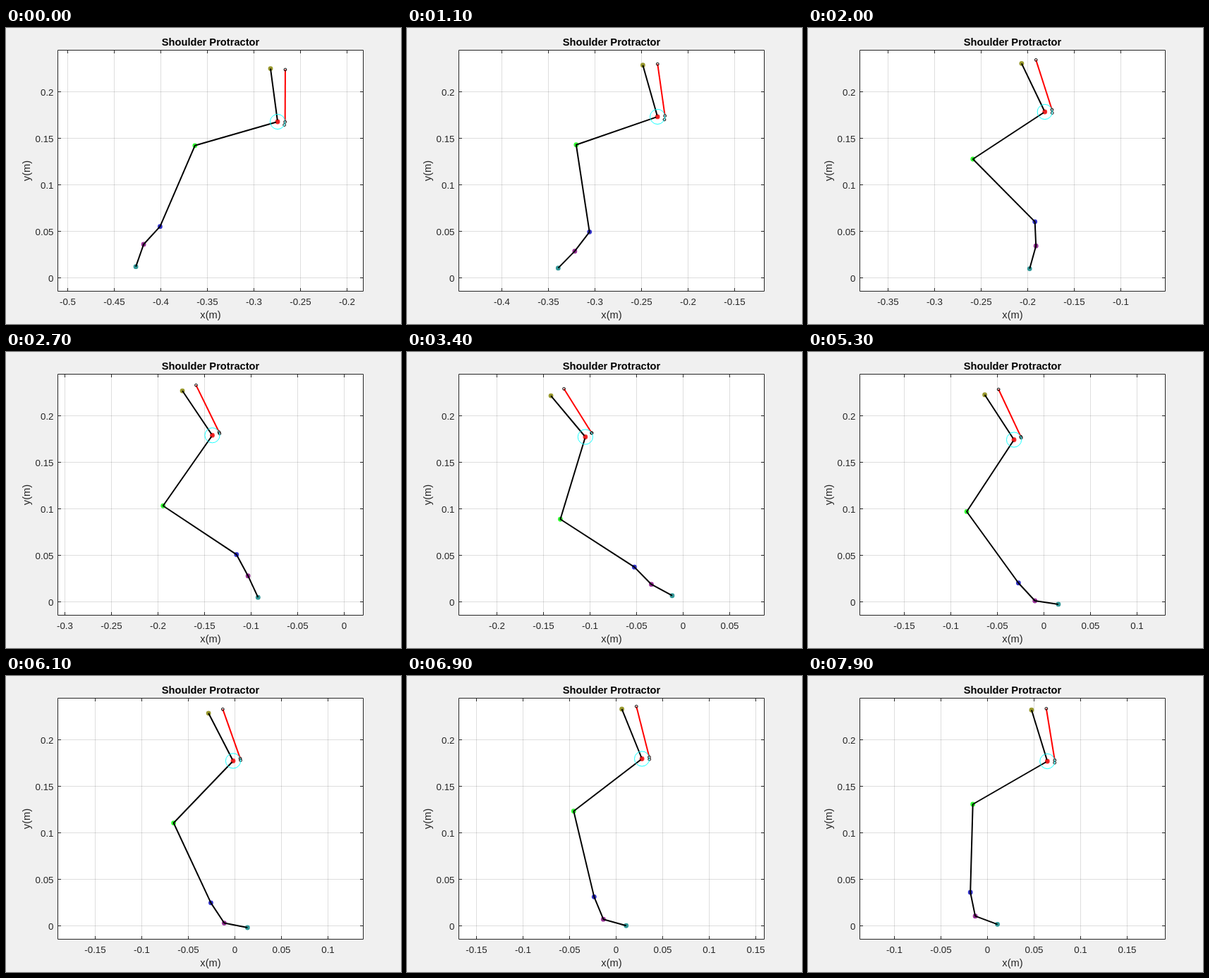
These frames come from a looping animation (560 px wide and 420 px high, 8 s). An HTML page with a canvas:

```html
<!DOCTYPE html>
<html lang="en">
<head>
<meta charset="utf-8">
<title>Shoulder Protractor</title>
<style>
  html, body { margin: 0; width: 100%; height: 100%; overflow: hidden; background: #f0f0f0; }
  canvas { display: block; }
</style>
</head>
<body>
<canvas id="stage" width="560" height="420"></canvas>
<script>
const ctx = document.getElementById('stage').getContext('2d');
const LOOP = 8000, STEP = 100, HOLD = 400;
const BOX = { left: 73.5, top: 31.5, right: 506.5, bottom: 373.5 };
const MID = (BOX.left + BOX.right) / 2;
const TICK = 66;       // pixels per 0.05 m
const GROUND = 354.5;  // y = 0
const INK = '#262626';
const FONT = '"Liberation Sans", Arial, sans-serif';
const RAD = Math.PI / 180;

// Time, shoulder x, shoulder y, then segment angles in degrees:
// scapula, humerus, forearm, metacarpus, hand
const POSES = [
  [400, -362, 133, 7.6, 73.9, 23.3, 42.6, 19.2],
  [1200, -300, 125, 17, 70, -13, 35, 45],
  [2000, -239.5, 119, 25.6, 56.7, -44.7, -2.5, 15.5],
  [3400, -139, 120.5, 39.9, 16.9, -57.1, -44.4, -61.5],
  [4200, -93.5, 125.5, 40.2, 17.2, -49.2, -46.8, -77],
  [5300, -42, 124.5, 33, 33.3, -35.9, -42.7, -81.5],
  [6900, 37, 117.5, 22, 52.5, -13.4, -22.4, -74.3],
  [7900, 84.5, 121, 17.1, 60, 1.6, -11.6, -69.6]
];
const LENGTHS = [122, 125, 34.4, 33.6];
const COLORS = ['#99992e', '#ff3333', '#33ff33', '#3333cc', '#993399', '#339999'];
const WRAP = 10.6;

function secant(i, c) {
  const a = POSES[i], b = POSES[i + 1];
  return (b[c] - a[c]) / (b[0] - a[0]);
}

function slope(i, c) {
  const last = POSES.length - 1;
  if (i === 0) return secant(0, c);
  if (i === last) return secant(last - 1, c);
  const before = POSES[i][0] - POSES[i - 1][0];
  const after = POSES[i + 1][0] - POSES[i][0];
  return (secant(i - 1, c) * after + secant(i, c) * before) / (before + after);
}

// Cubic Hermite interpolation of every pose column
function poseAt(t) {
  let i = 0;
  while (i < POSES.length - 2 && t >= POSES[i + 1][0]) i++;
  const a = POSES[i], b = POSES[i + 1];
  const d = b[0] - a[0], u = (t - a[0]) / d, v = 1 - u;
  return a.slice(1).map((p, k) => {
    const c = k + 1;
    return v * v * (1 + 2 * u) * p + u * u * (3 - 2 * u) * b[c]
      + u * v * d * (v * slope(i, c) - u * slope(i + 1, c));
  });
}

function down(p, deg, len) {
  return [p[0] - len * Math.sin(deg * RAD), p[1] + len * Math.cos(deg * RAD)];
}

function up(p, deg, len) {
  return [p[0] - len * Math.sin(deg * RAD), p[1] - len * Math.cos(deg * RAD)];
}

function onWrap(p, deg) {
  return [p[0] + WRAP * Math.cos(deg * RAD), p[1] - WRAP * Math.sin(deg * RAD)];
}

function solve(t) {
  const [x, y, scapula, ...angles] = poseAt(t);
  const shoulder = [x, y];
  const limb = [up(shoulder, scapula, 76.1), shoulder];
  angles.forEach((a, i) => limb.push(down(limb[i + 1], a, LENGTHS[i])));

  const tangent = scapula - 9, insertion = 48.5 - angles[0];
  const origin = up(onWrap(shoulder, tangent), scapula - 7.8, 74.2);
  const muscle = [origin, onWrap(shoulder, Math.max(tangent, insertion)), onWrap(shoulder, insertion)];

  // The view stays centred on the horizontal extent
  const xs = [...limb, ...muscle].map(p => p[0]);
  const shift = MID - (Math.min(...xs) + Math.max(...xs)) / 2;
  for (const p of [...limb, ...muscle]) p[0] += p === shoulder ? 0 : shift;
  shoulder[0] = x + shift;
  return { limb, muscle, shift };
}

function line(points, color, width) {
  ctx.strokeStyle = color;
  ctx.lineWidth = width;
  ctx.beginPath();
  points.forEach(p => ctx.lineTo(p[0], p[1]));
  ctx.stroke();
}

function ring(p, r, color, width) {
  ctx.strokeStyle = color;
  ctx.lineWidth = width;
  ctx.beginPath();
  ctx.arc(p[0], p[1], r, 0, 2 * Math.PI);
  ctx.stroke();
}

function dot(p, r, color) {
  ctx.fillStyle = color;
  ctx.beginPath();
  ctx.arc(p[0], p[1], r, 0, 2 * Math.PI);
  ctx.fill();
}

function text(str, x, y, size, align = 'center', color = INK, weight = '') {
  ctx.font = `${weight} ${size}px ${FONT}`;
  ctx.textAlign = align;
  ctx.fillStyle = color;
  ctx.fillText(str, x, y);
}

const label = k => String(+(k * 0.05).toFixed(2));

function drawAxes(zero) {
  const { left, top, right, bottom } = BOX;
  ctx.fillStyle = '#f0f0f0';
  ctx.fillRect(0, 0, 560, 420);
  ctx.fillStyle = '#fff';
  ctx.fillRect(left, top, right - left, bottom - top);

  const grid = 'rgba(38,38,38,0.15)';
  const first = Math.ceil((left - zero) / TICK), last = Math.floor((right - zero) / TICK);
  for (let k = first; k <= last; k++) {
    const x = Math.floor(zero + k * TICK) + 0.5;
    line([[x, top], [x, bottom]], grid, 1);
    line([[x, top], [x, top + 4.5]], INK, 1);
    line([[x, bottom], [x, bottom - 4.5]], INK, 1);
    text(label(k), x, 393, 13.33);
  }
  for (let k = 0; k < 5; k++) {
    const y = GROUND - k * TICK;
    line([[left, y], [right, y]], grid, 1);
    line([[left, y], [left + 4.5, y]], INK, 1);
    line([[right, y], [right - 4.5, y]], INK, 1);
    text(label(k), 67.5, y + 5.5, 13.33, 'right');
  }
  ctx.strokeStyle = INK;
  ctx.lineWidth = 1;
  ctx.strokeRect(left, top, right - left, bottom - top);

  text('Shoulder Protractor', MID, 25, 14.67, 'center', '#000', 'bold');
  text('x(m)', MID, 412, 14.67);
  ctx.save();
  ctx.translate(34, 202.5);
  ctx.rotate(-Math.PI / 2);
  text('y(m)', 0, 0, 14.67);
  ctx.restore();
}

function draw(t) {
  const time = Math.max(HOLD, Math.floor(t / STEP) * STEP);
  const { limb, muscle, shift } = solve(time);
  drawAxes(shift);
  ctx.lineJoin = 'round';
  limb.forEach((p, i) => dot(p, 3.4, COLORS[i]));
  line(limb, '#000', 2);
  dot(limb[1], 2.4, '#e62020');
  line(muscle.slice(0, 2), '#f00', 2);
  muscle.forEach(p => ring(p, 1.9, '#000', 1));
  ring(limb[1], WRAP, '#0ff', 0.9);
}

const start = performance.now();
function tick() {
  draw((performance.now() - start) % LOOP);
  requestAnimationFrame(tick);
}
tick();
</script>
</body>
</html>
```
